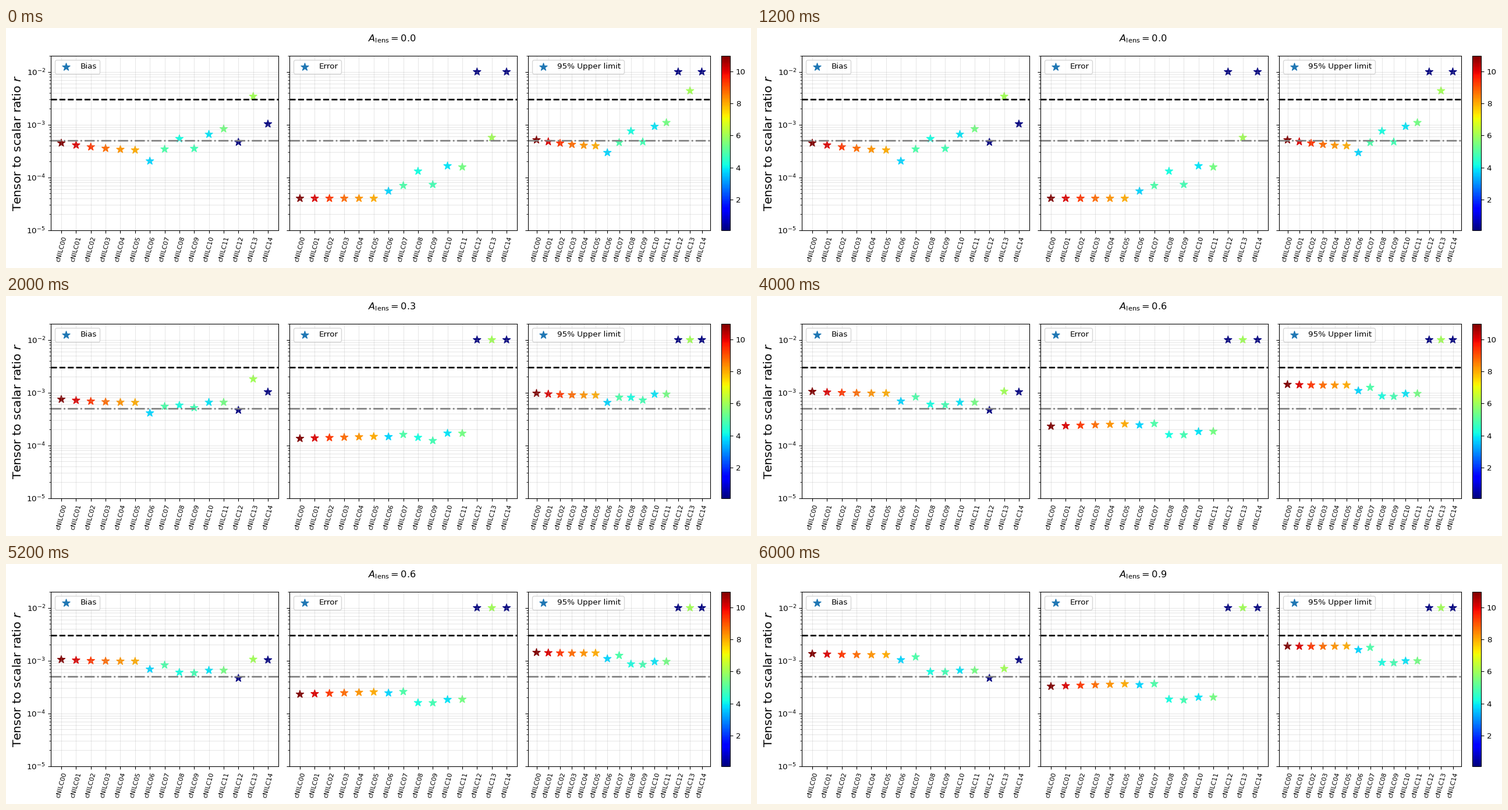
Recreate the animation shown at these times as a matplotlib script. Size 1280 px wide and 414 px high, loop 8 s.

```python
import matplotlib.pyplot as plt
import numpy as np
from matplotlib.animation import FuncAnimation

WIDTH, HEIGHT, DPI = 1280, 414, 97.6
LEFT, BOTTOM = 77.3, 348.7
PANEL_W, PANEL_H, GAP = 390.5, 300.5, 19.5
CAP = 1e-2

plt.rcParams["font.family"] = "DejaVu Sans"

COUNT = 15
x = np.arange(COUNT)
first = np.arange(6)
colour_values = np.r_[11 - first + 0.08 * first**2,
                      3.7, 4.9, 4.2, 4.8, 3.9, 5.4, 0.1, 6.0, 0.1]


def bias_at(a):
    """The first methods grow with the amplitude, the others settle."""
    growing = 4.47 - 0.42 * first + 0.037 * first**2 + (10 + 0.14 * first) * a
    curving = np.array([2.04, 3.43]) + 5.7 * a + 3.9 * a**2
    plateau = np.array([6.5, 6.3, 6.54, 6.54, 4.65, 4.0, 10.3])
    excess = np.array([-1.1, -2.78, 0, 1.77, 0, 30.3, 0])
    rate = np.array([1.3, 3, 0, 20, 0, 2.55, 0])
    settling = plateau + excess * np.exp(-rate * a)
    return np.r_[growing, curving, settling] * 1e-4


def error_at(a):
    """Errors are quadratic in the amplitude; the last methods saturate."""
    growing = 0.4 + (3.17 + 0.08 * first) * a
    curving = np.array([0.55, 0.70]) + 2.9 * a + 0.4 * a**2
    flat = (np.array([1.31, 0.73, 1.65, 1.57])
            + np.array([0.2, 1.9, 0.05, 0.35]) * a
            + np.array([0.45, -0.8, 0.4, 0.17]) * a**2)
    saturating = np.array([100, 5.69 + 400 * a, 100])
    return np.r_[growing, curving, flat, saturating] * 1e-4


def series(a):
    bias, error = bias_at(a), np.minimum(error_at(a), CAP)
    upper_limit = np.minimum(bias + 1.645 * error, CAP)
    # An unconstrained error leaves the limit unconstrained too.
    upper_limit[error >= CAP] = CAP
    return bias, error, upper_limit


fig = plt.figure(figsize=((WIDTH + 1e-6) / DPI, (HEIGHT + 1e-6) / DPI),
                 dpi=DPI, facecolor="white")


def add_axes(left, width):
    return fig.add_axes([left / WIDTH, 1 - BOTTOM / HEIGHT,
                         width / WIDTH, PANEL_H / HEIGHT])


def add_panel(index, name):
    width = PANEL_W * (0.8 if index == 2 else 1)
    ax = add_axes(LEFT + index * (PANEL_W + GAP), width)
    stars = ax.scatter(x, series(0)[index], c=colour_values, s=100,
                       marker="*", cmap="jet", vmin=0.08, vmax=10.97)
    ax.scatter([], [], s=100, marker="*", color="C0", label=name)
    ax.axhline(3e-3, color="black", ls="--", lw=2)
    ax.axhline(5e-4, color="gray", ls="-.", lw=2)
    ax.set_yscale("log")
    ax.set_ylim(1e-5, 2e-2)
    ax.set_xlim(-0.05 * (COUNT - 1), 1.05 * (COUNT - 1))
    ax.set_xticks(x, [f"cNILC{i:02d}" for i in x], rotation=75, fontsize=8)
    ax.grid(which="both", alpha=0.3)
    ax.legend(loc="upper left")
    if index:
        ax.tick_params(axis="y", which="both", labelleft=False)
    else:
        ax.set_ylabel("Tensor to scalar ratio $r$", fontsize=15)
    return stars


panels = [add_panel(i, name)
          for i, name in enumerate(["Bias", "Error", "95% Upper limit"])]
fig.colorbar(panels[2], cax=add_axes(1229.3, 15))
title = fig.text(662.9 / WIDTH, 1 - 9.6 / HEIGHT, "", fontsize=12,
                 ha="center", va="top")


def update(step):
    amplitude = 0.3 * step
    for stars, values in zip(panels, series(amplitude)):
        stars.set_offsets(np.column_stack([x, values]))
    title.set_text(rf"$A_{{\rm lens}} = {amplitude:.1f}$")
    return [*panels, title]


anim = FuncAnimation(fig, update, frames=4, interval=2000,
                     repeat=True, repeat_delay=0, blit=False)
plt.show()
```
